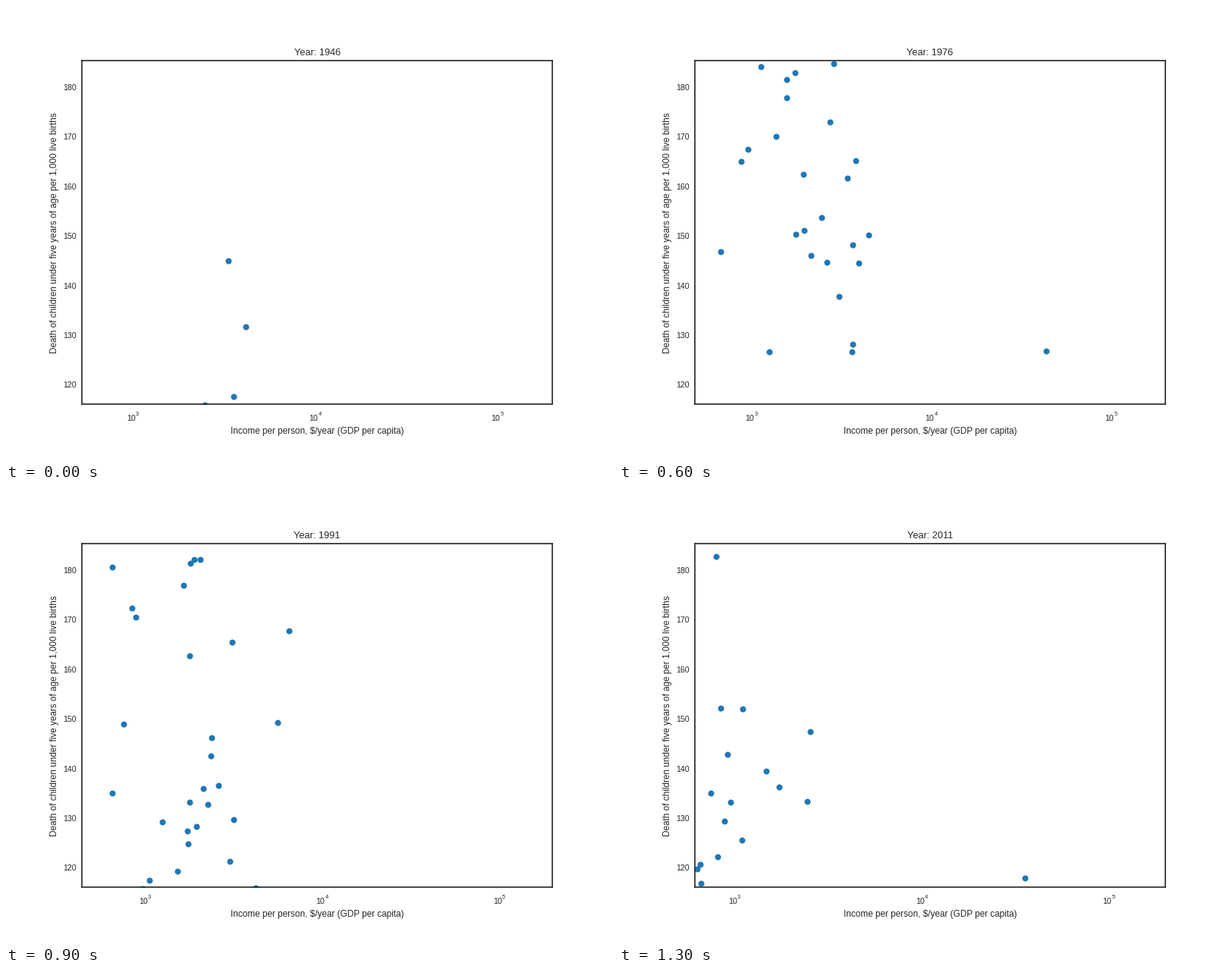
Recreate the animation shown at these times as a matplotlib script. Size 800 by 600 pixels, loop 1400 ms.

```python
import numpy as np
import matplotlib.pyplot as plt
from matplotlib.animation import FuncAnimation

plt.rcParams.update({
    "font.family": "Liberation Sans",
    "text.color": "0.15",
    "axes.edgecolor": "0.15",
    "axes.linewidth": 1.25,
})

WIDTH, HEIGHT, DPI = 800, 600, 96
LEFT, RIGHT, TOP, BOTTOM = 100, 720, 72, 525
YEARS = range(1946, 2016, 5)
MAX_LOG = np.log10(2e5)
MID_DEATHS = 150
DECLINE, GROWTH = 0.0236, 0.003   # per year
WIDE_COVERAGE = 1960              # before this only a few countries report

# The poorest country sets the left end of the income axis.
LOW_YEARS = [1946, 1966, 1981, 1991, 1996, 2001, 2011]
LOW_INCOMES = [526, 461, 499, 441, 153, 504, 615]

# Early reporters: year of 150 deaths and log income in that year.
EARLY = [(1935.1, 3.36), (1935.7, 3.52), (1940.5, 3.60),
         (1958.7, 3.10), (1960.7, 3.28), (1963.6, 3.02)]
# Outliers: the same, with their own yearly decline and growth.
OUTLIERS = [(1943.7, 3.484, 0.0146, 0.0157), (1951.7, 3.403, 0.045, 0.003),
            (1971.2, 4.638, 0.035, 0), (2000.75, 4.263, 0.0234, 0.028)]


def make_countries(count=75):
    """Rows of middle year, log income, decline, growth, first report."""
    rng = np.random.default_rng(12)
    middle = rng.normal(1987, 20, count)
    log_income = rng.normal(3.48 - 0.012 * (middle - 1968), 0.26)
    rows = [(*pair, DECLINE, GROWTH, 0) for pair in EARLY]
    rows += [(*outlier, 0) for outlier in OUTLIERS]
    rows += [(m, u, DECLINE, GROWTH, WIDE_COVERAGE)
             for m, u in zip(middle, log_income)]
    return np.array(rows)


COUNTRIES = make_countries()


def to_x(log_income, year):
    low = np.interp(year, LOW_YEARS, np.log10(LOW_INCOMES))
    return RIGHT - (RIGHT - LEFT) * (MAX_LOG - log_income) / (MAX_LOG - low)


def to_y(deaths):
    return 107 + 6.54 * (180 - deaths)


def dots_at(year):
    """Deaths fall and income grows exponentially in every country."""
    middle, log_income, decline, growth, first = COUNTRIES.T
    age = year - middle
    deaths = MID_DEATHS * np.exp(-decline * age)
    seen = year >= first
    return to_x(log_income + growth * age, year)[seen], to_y(deaths)[seen]


fig = plt.figure(figsize=(WIDTH / DPI, HEIGHT / DPI), dpi=DPI,
                 facecolor="white")
ax = fig.add_axes([LEFT / WIDTH, 1 - BOTTOM / HEIGHT,
                   (RIGHT - LEFT) / WIDTH, (BOTTOM - TOP) / HEIGHT])
# Stage pixels serve as coordinates; whole numbers fall on pixel centres.
ax.set(xlim=(LEFT - 0.5, RIGHT - 0.5), ylim=(BOTTOM - 0.5, TOP - 0.5),
       xticks=[], yticks=[])

title = ax.set_title("", fontsize=9.6, pad=5)
ax.text(409.5, 563.5, r"Income per person, \$/year (GDP per capita)",
        fontsize=8.8, ha="center", va="baseline")
ax.text(66.5, 298.5,
        "Death of children under five years of age per 1,000 live births",
        fontsize=8.8, rotation=90, rotation_mode="anchor",
        ha="center", va="baseline")
for value in range(120, 190, 10):
    ax.text(92, to_y(value) + 3.53, str(value),
            fontsize=8, ha="right", va="baseline")

powers = (3, 4, 5)
bases = [ax.text(0, 546.5, "10", fontsize=8, va="baseline") for _ in powers]
exponents = [ax.text(0, 539.5, str(p), fontsize=5.6, va="baseline")
             for p in powers]
dots, = ax.plot([], [], "o", color="#1f77b4", markersize=6, markeredgewidth=0)


def update(i):
    year = YEARS[i]
    title.set_text(f"Year: {year}")
    dots.set_data(*dots_at(year))
    for power, base, exponent in zip(powers, bases, exponents):
        x = to_x(power, year)
        base.set_x(x - 8.5)
        exponent.set_x(x + 3.5)
    return title, dots, *bases, *exponents


anim = FuncAnimation(fig, update, frames=len(YEARS), interval=100,
                     repeat=True, repeat_delay=0)
plt.show()
```
